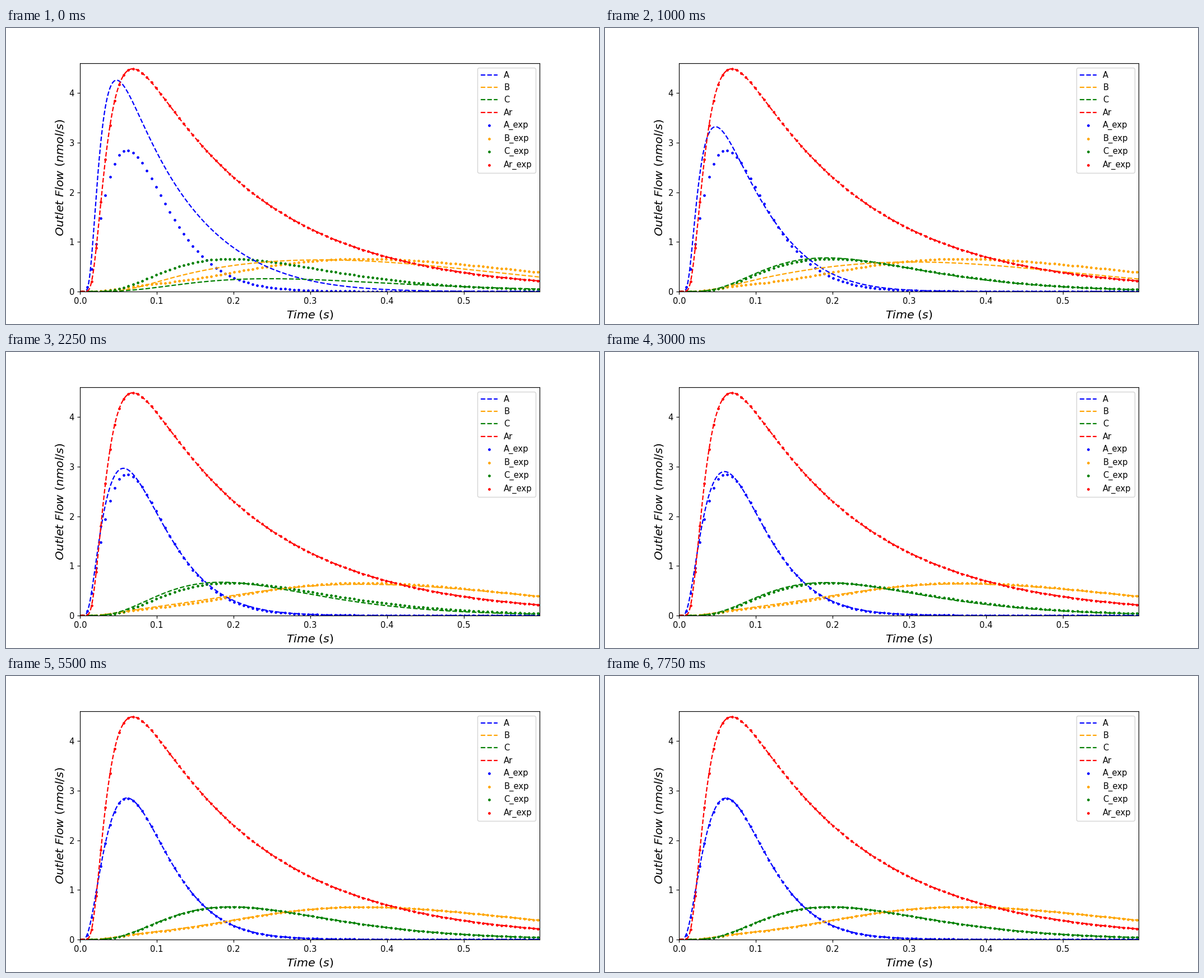
Write a matplotlib script that moves like this. It is 1058 px wide and 529 px high and loops after 8000 ms.

```python
import numpy as np
import matplotlib.pyplot as plt
from matplotlib.animation import FuncAnimation

STEP_MS, FRAMES = 250, 32
T_END = 0.599
COLORS = {"A": "blue", "B": "orange", "C": "green", "Ar": "red"}

# Stages of the fit; each pulse is (peak time, height, rise, fall, tail).
# The last stage is the measured pulse.
STAGE_TIMES = [0, 1, 2.25]
C_SHAPE = (.5, 2.8, 0)
STAGES = {
    "A": [(.0475, 4.262, 1.816, -.256, .058), (.0475, 3.322, 1.62, -.193, .108),
          (.0565, 2.968, .809, .878, .081), (.0612, 2.85, .37, 1.8, .027)],
    "B": [(.315, .637, 1.165, -2.97, 1.02), (.31, .59, .581, -.533, .634),
          (.37, .627, 0, 2.6, .2), (.372, .654, 0, 3.8, .03)],
    "C": [(.247, .257, *C_SHAPE), (.192, .677, *C_SHAPE),
          (.184, .67, *C_SHAPE), (.197, .657, *C_SHAPE)],
}
RATE = {"A": 1.1, "B": .45, "C": 1.1}


def pulse(t, peak, height, rise, fall, tail):
    """Skewed pulse that has its maximum at the peak time."""
    x = np.maximum(t, 1e-3) / peak
    log = np.log(x)
    drop = (rise * (log + 1 / x - 1) + fall * (x - 1 - log)
            + tail * (x * x - 1 - 2 * log))
    return height * np.exp(-drop)


def inert(t, scale=0.412):
    """Outlet flow of a unit pulse that only diffuses."""
    tau = np.maximum(t, 1e-3) / scale
    n = np.arange(60)[:, None]
    terms = (-1.0) ** n * (2 * n + 1) * np.exp(-((n + .5) * np.pi) ** 2 * tau)
    return np.where(t < .004, 0, np.pi * terms.sum(axis=0) / scale)


def flow(gas, t, params, share):
    """Gas B also has a small early shoulder, scaled by share."""
    shoulder = pulse(t, .095, .085 * share, 1, 2, 0) if gas == "B" else 0
    return pulse(t, *params) + shoulder


def settled(seconds, rate):
    return 1 - np.exp(-rate * seconds)


def fitted(gas, seconds):
    """Pulse parameters at a moment; each stage eases out exponentially."""
    rate = RATE[gas]
    i = np.searchsorted(STAGE_TIMES, seconds, side="right") - 1
    u = settled(seconds - STAGE_TIMES[i], rate)
    if i + 1 < len(STAGE_TIMES):
        u /= settled(STAGE_TIMES[i + 1] - STAGE_TIMES[i], rate)
    old, new = np.array(STAGES[gas][i:i + 2])
    return old + u * (new - old)


time = np.linspace(0, T_END, 600)
samples = np.arange(.003, .6, .006)

fig, ax = plt.subplots(figsize=(10, 5), dpi=105.8)
ax.set_xlabel(r"$Time\ (s)$", fontsize=14)
ax.set_ylabel(r"$Outlet\ Flow\ (nmol/s)$", fontsize=14)
ax.set_xlim(0, T_END)
ax.set_ylim(0, 4.598)

lines = {}
for gas, color in COLORS.items():
    lines[gas], = ax.plot(time, inert(time), "--", color=color, label=gas)
for gas, color in COLORS.items():
    if gas == "Ar":
        measured = inert(samples)
    else:
        measured = flow(gas, samples, STAGES[gas][-1], 1)
    ax.scatter(samples, measured, s=5, color=color, label=gas + "_exp")
ax.legend(loc="upper right")


def update(frame):
    seconds = frame * STEP_MS / 1000
    for gas in STAGES:
        lines[gas].set_ydata(flow(gas, time, fitted(gas, seconds), settled(seconds, 1.1)))
    return [lines[gas] for gas in STAGES]


anim = FuncAnimation(fig, update, frames=FRAMES, interval=STEP_MS,
                     repeat=True, repeat_delay=0, blit=False)
plt.show()
```
